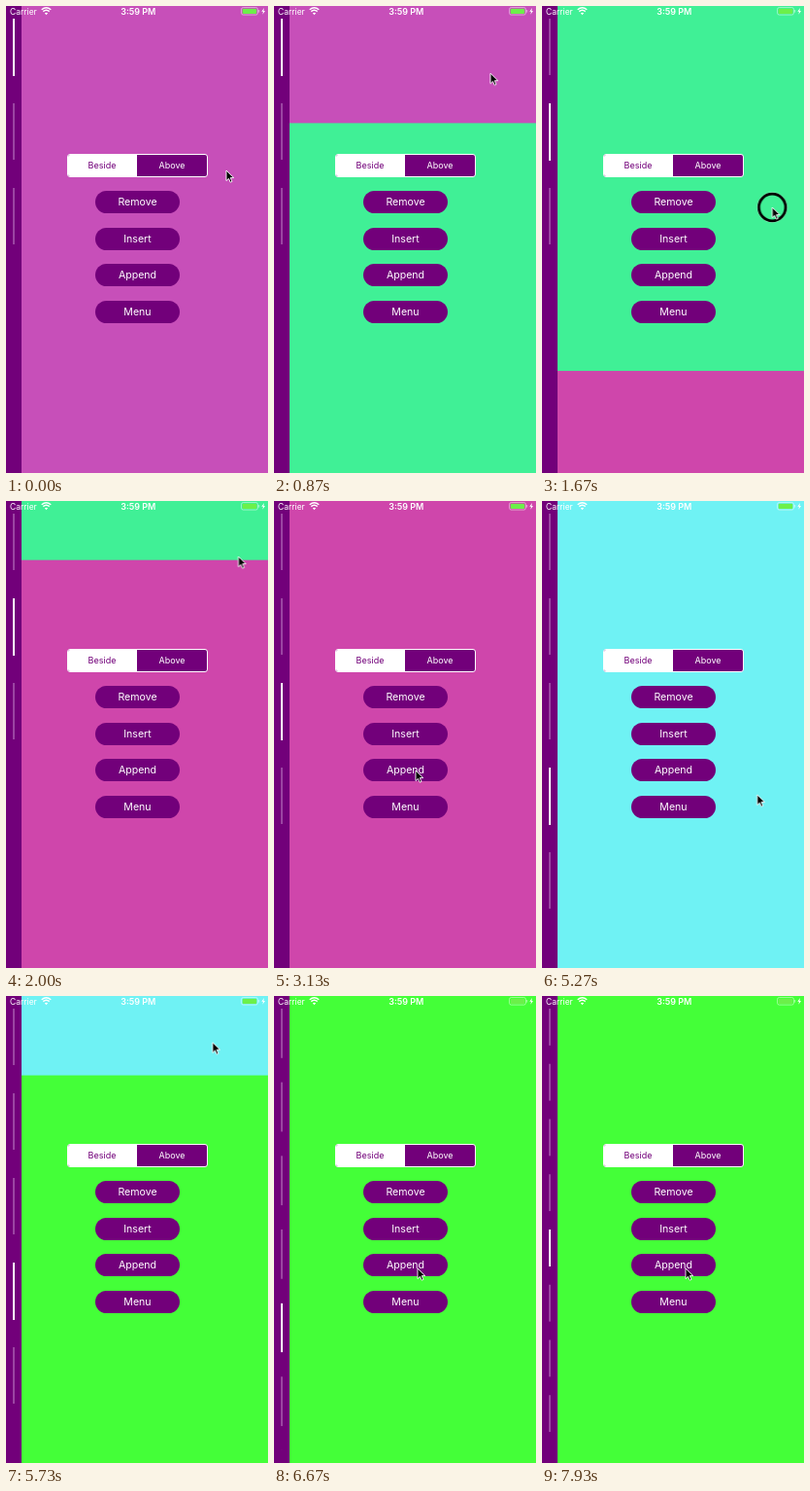
An HTML page for the animation above (8 s loop, 270 by 480 pixels).

```html
<!DOCTYPE html>
<html lang="en">
<head>
<meta charset="utf-8">
<title>Page swipe demo</title>
<style>
html, body { margin: 0; width: 100%; height: 100%; overflow: hidden; }
body { position: relative; font-family: Inter, Roboto, sans-serif; color: #fff; }
#stage { position: absolute; left: 0; top: 0; width: 270px; height: 480px; overflow: hidden; --plum: #72007a; }
#stage * { position: absolute; box-sizing: border-box; }

#pages { inset: 0 0 auto; height: 2400px; animation: scroll 8s linear infinite; }
#pages i { left: 0; width: 100%; height: 480px; }

#side { left: 0; top: 0; width: 16px; height: 480px; background: var(--plum); }
#bars {
  left: 7px; top: 13px; width: 2px;
  background: linear-gradient(#9b45a2 66.667%, transparent 0) 0 0 / 2px 87px repeat-y;
  animation: count 8s step-end infinite;
}
#active { left: 7px; width: 2px; background: #fff; animation: active 8s step-end infinite; }

.seg {
  left: 63px; top: 152px; width: 145px; height: 24px; overflow: hidden;
  border: 1px solid #fff; border-radius: 3px; background: var(--plum);
}
.seg span { top: 0; width: 72px; height: 22px; font-size: 9px; line-height: 22px; text-align: center; }
.seg .on { left: -1px; background: #fff; color: var(--plum); }
.seg .off { left: 71px; }
.btn {
  left: 92px; width: 87px; height: 23px; border-radius: 12px; background: var(--plum);
  font-size: 10.6px; line-height: 23px; text-align: center;
}
svg { left: 0; top: 0; overflow: visible; }
#cursor { animation: move 8s linear infinite; }
#touch { animation: touch 8s step-end infinite; }

@keyframes scroll {
  0%, 5.5% { transform: translateY(0); }
  7.2% { transform: translateY(-90px); }
  9.25% { transform: translateY(-245px); }
  10.875% { transform: translateY(-359px); }
  12% { transform: translateY(-420px); }
  13.5% { transform: translateY(-462px); }
  15% { transform: translateY(-477px); }
  16.25%, 19.2% { transform: translateY(-480px); }
  20.6% { transform: translateY(-560px); }
  22.5% { transform: translateY(-725px); }
  23.75% { transform: translateY(-834px); }
  25% { transform: translateY(-899px); }
  26.25% { transform: translateY(-935px); }
  27.5% { transform: translateY(-953px); }
  29.1%, 54.4% { transform: translateY(-960px); }
  56.25% { transform: translateY(-1055px); }
  58.375% { transform: translateY(-1205px); }
  60% { transform: translateY(-1319px); }
  61.5% { transform: translateY(-1390px); }
  62.8% { transform: translateY(-1425px); }
  64.1%, 66.7% { transform: translateY(-1440px); }
  68% { transform: translateY(-1525px); }
  70% { transform: translateY(-1710px); }
  71.625% { transform: translateY(-1838px); }
  73% { transform: translateY(-1887px); }
  74.4% { transform: translateY(-1911px); }
  75.8%, 100% { transform: translateY(-1920px); }
}
@keyframes count {
  0% { height: 261px; background-size: 2px 87px; }
  38.3% { height: 348px; background-size: 2px 87px; }
  45.4% { height: 435px; background-size: 2px 87px; }
  83.375% { height: 454px; background-size: 2px 75.67px; }
  90% { height: 454px; background-size: 2px 64.86px; }
  96.25%, 100% { height: 454px; background-size: 2px 56.75px; }
}
@keyframes active {
  0% { top: 13px; height: 58.5px; }
  15.8% { top: 100px; height: 58.5px; }
  30% { top: 187px; height: 58.5px; }
  64.1% { top: 274px; height: 58.5px; }
  75.8% { top: 361px; height: 58.5px; }
  83.375% { top: 315.7px; height: 50.4px; }
  90% { top: 272.4px; height: 43.2px; }
  96.25%, 100% { top: 240px; height: 38px; }
}
@keyframes move {
  0%, .8% { transform: translate(227px, 169px); }
  4.1% { transform: translate(232px, 300px); }
  5.5% { transform: translate(232px, 314px); }
  7.2% { transform: translate(230px, 224px); }
  9.25% { transform: translate(225px, 78px); }
  10.875% { transform: translate(223px, 69px); }
  12.5% { transform: translate(224px, 90px); }
  16.6% { transform: translate(235px, 308px); }
  19.2% { transform: translate(236px, 311px); }
  20.6% { transform: translate(237px, 231px); }
  22.5% { transform: translate(239px, 72px); }
  25% { transform: translate(239.5px, 57px); }
  29.1% { transform: translate(236px, 66px); }
  32% { transform: translate(195px, 185px); }
  35% { transform: translate(147px, 279px); }
  39.125%, 50% { transform: translate(146px, 277px); }
  53.4% { transform: translate(222px, 308px); }
  54.4% { transform: translate(225px, 314px); }
  56.25% { transform: translate(226px, 219px); }
  58.375% { transform: translate(227.5px, 69px); }
  60% { transform: translate(226px, 56px); }
  61.6% { transform: translate(225px, 75px); }
  65.6% { transform: translate(222px, 300px); }
  66.7% { transform: translate(221px, 307px); }
  68% { transform: translate(219px, 222px); }
  70% { transform: translate(214px, 62px); }
  71.625% { transform: translate(213px, 47px); }
  75.8% { transform: translate(152px, 270px); }
  79%, 100% { transform: translate(148px, 280px); }
}
@keyframes touch {
  0% { opacity: 0; }
  5.3% { opacity: 1; } 9.5% { opacity: 0; }
  19.2% { opacity: 1; } 22.8% { opacity: 0; }
  36% { opacity: 1; } 37.6% { opacity: 0; }
  44.1% { opacity: 1; } 45.8% { opacity: 0; }
  54.4% { opacity: 1; } 58.9% { opacity: 0; }
  66.6% { opacity: 1; } 70.2% { opacity: 0; }
  79.2% { opacity: 1; } 81.6% { opacity: 0; }
  87.5% { opacity: 1; } 89.3% { opacity: 0; }
  93.3% { opacity: 1; } 95% { opacity: 0; }
  100% { opacity: 0; }
}
</style>
</head>
<body>
<div id="stage">
  <div id="pages">
    <i style="top:0;background:#c74fb9"></i>
    <i style="top:480px;background:#40f096"></i>
    <i style="top:960px;background:#cf46ab"></i>
    <i style="top:1440px;background:#6ff2f4"></i>
    <i style="top:1920px;background:#44ff38"></i>
  </div>
  <div id="side"></div>
  <div id="bars"></div>
  <div id="active"></div>

  <div class="seg"><span class="on">Beside</span><span class="off">Above</span></div>
  <div class="btn" style="top:190px">Remove</div>
  <div class="btn" style="top:227.5px">Insert</div>
  <div class="btn" style="top:265px">Append</div>
  <div class="btn" style="top:302.5px">Menu</div>

  <svg width="270" height="480">
    <g fill="#fff">
      <text x="4" y="8.5" font-size="8.5">Carrier</text>
      <text x="136.3" y="8.6" font-size="9" font-weight="600" text-anchor="middle">3:59 PM</text>
      <path d="M41.5 9.2L39.8 7.3Q41.5 6 43.2 7.3Z"/>
      <path d="M38.3 5.6Q41.5 2.9 44.7 5.6M36.7 3.8Q41.5 -.2 46.3 3.8" fill="none" stroke="#fff" stroke-width="1.4"/>
      <path d="M266 2L263.3 5.8H265L264.4 8.8L267 4.9H265.4Z"/>
    </g>
    <rect x="242.5" y="1.5" width="17" height="7.6" rx="2" fill="none" stroke="#fff" stroke-opacity=".55" stroke-width=".8"/>
    <rect x="243.7" y="2.7" width="14.6" height="5.2" rx="1" fill="#6cf04a"/>
    <path d="M260.7 4v2.6" stroke="#fff" stroke-opacity=".55"/>
    <g id="cursor">
      <g id="touch" fill="none">
        <circle r="15.3" stroke="#fff" stroke-opacity=".5"/>
        <circle r="13.8" stroke="#000" stroke-width="2.8"/>
      </g>
      <path d="M0 0V10.6L2.5 8.3L4.2 12.2L6 11.4L4.3 7.6H7.8Z" fill="#000" stroke="#fff" stroke-width=".9" stroke-linejoin="round"/>
    </g>
  </svg>
</div>
</body>
</html>
```
